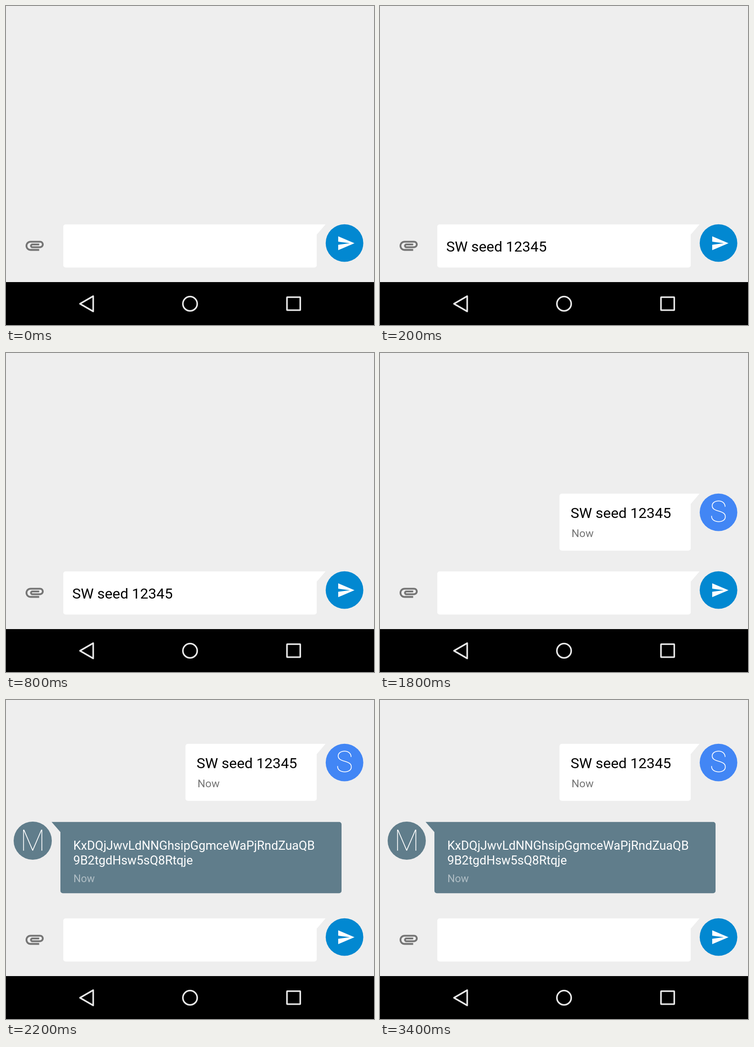
Recreate the animation shown at these times as an HTML page. Size 771 px wide and 669 px high, loop 4200 ms.

```html
<!DOCTYPE html>
<html lang="en">
<head>
<meta charset="utf-8">
<title>Seed by text message</title>
<style>
  html, body { margin: 0; width: 100%; height: 100%; overflow: hidden; background: #eee; }
  svg { display: block; width: 771px; height: 669px; }
  text { font-family: Roboto, sans-serif; white-space: pre; }

  .message { font-size: 30.4px; fill: #000; }
  .key { font-size: 25.6px; fill: #fff; }
  .time { font-size: 22.8px; fill: #757575; }
  .reply .time { font-size: 22px; fill: #b0bec5; }
  .initial { font-size: 60.5px; font-weight: 100; fill: #fff; text-anchor: middle; }
  .nav { fill: none; stroke: #e8e8e8; stroke-width: 3.3; }

  .typed, .sent, .reply { animation: 4200ms step-end infinite; visibility: hidden; }
  .typed { animation-name: typed; }
  .sent { animation-name: sent; }
  .reply { animation-name: reply; }

  /* Steps fall at 200, 1200 and 2200 ms of the loop. */
  @keyframes typed {
    0%, 28.5714% { visibility: hidden; }
    4.7619% { visibility: visible; }
    100% { visibility: hidden; }
  }
  @keyframes sent {
    0% { visibility: hidden; transform: translateY(0); }
    28.5714% { visibility: visible; transform: translateY(0); }
    52.381%, 100% { visibility: visible; transform: translateY(-203px); }
  }
  @keyframes reply {
    0% { visibility: hidden; }
    52.381%, 100% { visibility: visible; }
  }
</style>
</head>
<body>
<svg viewBox="0 0 771 669">
  <rect width="771" height="669" fill="#eee"/>

  <g class="sent">
    <path fill="#fff" d="M381 295H669.5L651 316.5V409.5a5 5 0 0 1-5 5H381a5 5 0 0 1-5-5V300a5 5 0 0 1 5-5z"/>
    <text class="message" x="399.3" y="346">SW seed 12345</text>
    <text class="time" x="401.2" y="386">Now</text>
    <circle cx="709.2" cy="334.2" r="39.4" fill="#4286f5"/>
    <text class="initial" x="709" y="354">S</text>
  </g>

  <g class="reply">
    <path fill="#607d8b" d="M95.5 255.7H698a5 5 0 0 1 5 5V400.3a5 5 0 0 1-5 5H119a5 5 0 0 1-5-5V277z"/>
    <text class="key" x="141" y="314.3">KxDQjJwvLdNNGhsipGgmceWaPjRndZuaQB</text>
    <text class="key" x="141" y="345.3">9B2tgdHsw5sQ8Rtqje</text>
    <text class="time" x="141.3" y="382.3">Now</text>
    <circle cx="56" cy="295" r="40" fill="#607d8b"/>
    <text class="initial" x="56" y="315.6">M</text>
  </g>

  <path fill="#757575" transform="translate(37.2 479.2) scale(1.9)" d="M2 12.5C2 9.46 4.46 7 7.5 7H18c2.21 0 4 1.79 4 4s-1.79 4-4 4H9.5C8.12 15 7 13.88 7 12.5S8.12 10 9.5 10H17v2H9.41c-.55 0-.55 1 0 1H18c1.1 0 2-.9 2-2s-.9-2-2-2H7.5C5.57 9 4 10.57 4 12.5S5.57 16 7.5 16H17v2H7.5C4.46 18 2 15.54 2 12.5z"/>
  <path fill="#fff" d="M125 458H669.5L651 479.5V543.5a5 5 0 0 1-5 5H125a5 5 0 0 1-5-5V463a5 5 0 0 1 5-5z"/>
  <text class="message typed" x="138.7" y="515.3">SW seed 12345</text>
  <circle cx="709.2" cy="497.2" r="39.4" fill="#0288d1"/>
  <path fill="#fff" transform="translate(692.8 478.1) scale(1.62)" d="M2 21L23 12 2 3V10l15 2-15 2z"/>

  <rect y="579" width="771" height="90"/>
  <g class="nav">
    <path stroke-linejoin="round" d="M155 624.5L182.7 608.5V640.5z"/>
    <circle cx="385.6" cy="624.4" r="15"/>
    <rect x="588.7" y="610.6" width="27.8" height="27.3" rx=".6"/>
  </g>
</svg>
</body>
</html>
```
